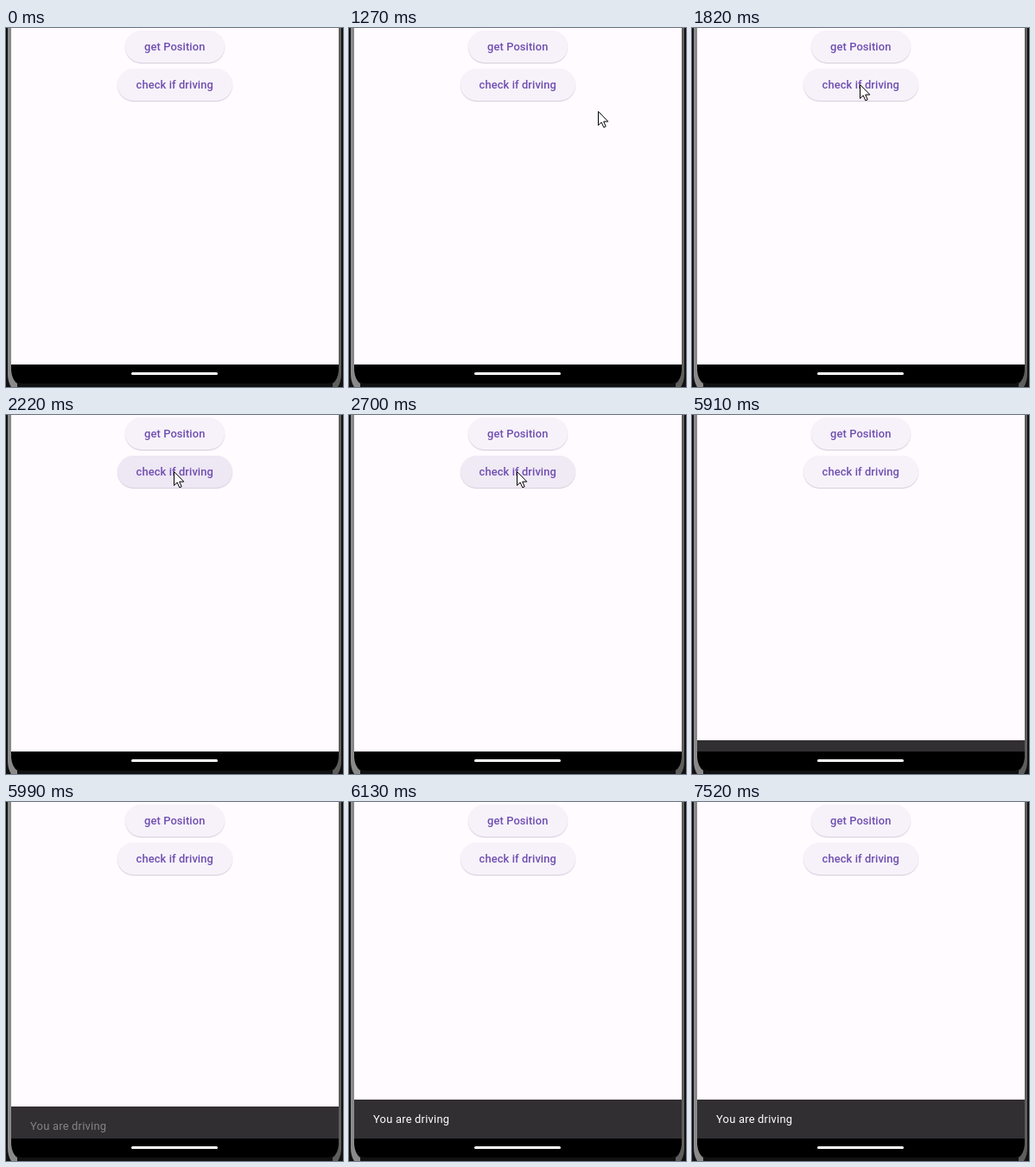
An HTML page that plays this animation: 390 px wide and 415 px high, repeating every 8250 ms.

```html
<!DOCTYPE html>
<html lang="en">
<head>
<meta charset="utf-8">
<title>Driving check</title>
<style>
html, body { margin: 0; width: 100%; height: 100%; overflow: hidden; background: #000; }
#stage { position: relative; width: 390px; height: 415px; overflow: hidden; background: #000; font-family: Roboto, sans-serif; }
#stage * { position: absolute; box-sizing: border-box; }
#phone, #cursor { left: 0; top: 0; overflow: visible; }
#screen { left: 6px; top: 0; width: 379px; height: 389px; overflow: hidden; background: #fffbff; }
.btn { height: 36.5px; border-radius: 19px; background: #f7f2fa; color: #6f4eb0;
  box-shadow: 0 1px 1.2px rgba(70, 50, 100, .24);
  font-weight: 500; font-size: 12.9px; letter-spacing: .09px; line-height: 37px; text-align: center; }
.btn span { left: 0; width: 100%; }
#position { left: 132px; top: 3px; width: 114.5px; }
#check { left: 122.5px; top: 47px; width: 133.5px; }
#tint { inset: 0; border-radius: 19px; background: #6750a4; opacity: 0; }
#snack { left: 0; top: 344px; width: 100%; height: 45px; background: #322f33; color: #fff;
  font-size: 12.9px; letter-spacing: .23px; line-height: 45px; padding-left: 22px; transform: translateY(46px); }
#pill { left: 145px; top: 398px; width: 100px; height: 3px; border-radius: 1.5px; background: #fff; }
</style>
</head>
<body>
<div id="stage">
  <svg id="phone" width="390" height="415">
    <rect width="390" height="415" fill="#111"/>
    <path d="M6 380H385V396Q384 410 372 411H19Q7 410 6 396Z" fill="#000"/>
    <path d="M2 0H6V396Q7 407 13 411V415H6Q2 409 2 400Z" fill="#8a8a8a"/>
    <path d="M388 0H385V396Q384 407 378 411V415H384Q388 409 388 400Z" fill="#5e5e5c"/>
  </svg>
  <div id="screen">
    <div class="btn" id="position"><span>get Position</span></div>
    <div class="btn" id="check"><div id="tint"></div><span>check if driving</span></div>
    <div id="snack"><span id="msg">You are driving</span></div>
  </div>
  <div id="pill"></div>
  <svg id="cursor" width="14" height="21">
    <path d="M.5 .5V16.5L4.2 13L6.8 18.8L9.2 17.8L6.7 12.1H11.8Z" fill="#fff" stroke="#000"/>
  </svg>
</div>
<script>
const LOOP = 8250;
const $ = id => document.getElementById(id);

// rows: [ms, value]; each value holds until the next row
function play(el, prop, rows) {
  const frames = rows.map(([t, v]) => ({ offset: t / LOOP, [prop]: v, easing: 'steps(1, end)' }));
  frames.push({ offset: 1, [prop]: rows[rows.length - 1][1] });
  el.animate(frames, { duration: LOOP, iterations: Infinity }).startTime = 0;
}

const at = (x, y) => `translate(${x}px, ${y}px)`;
const away = at(420, 430);

// pointer glides in from the right and slows down over the button
const glide = Array.from({ length: 12 }, (_, i) => {
  const left = (1 - i / 11) ** 2;
  return [1060 + i * 760 / 11, at(Math.round(194 + 178 * left), Math.round(65 + 68 * left ** 1.25))];
});

play($('cursor'), 'transform', [
  [0, away], ...glide,
  [5170, at(306, 68)], [5240, at(370, 73)], [5310, away],
  [7390, at(371, 396)], [7450, at(378, 369)], [7520, away]
]);

play($('tint'), 'opacity', [
  [0, 0], [2100, .03], [2160, .06], [2230, .08], [2290, .09],
  [2500, .07], [2600, .055], [2700, .045], [5170, 0]
]);

play($('snack'), 'transform', [
  [0, at(0, 46)], [5910, at(0, 32)], [5990, at(0, 8)], [6060, at(0, 1)], [6130, at(0, 0)]
]);

play($('msg'), 'opacity', [[0, 0], [5990, .4], [6060, .9], [6130, 1]]);
</script>
</body>
</html>
```
